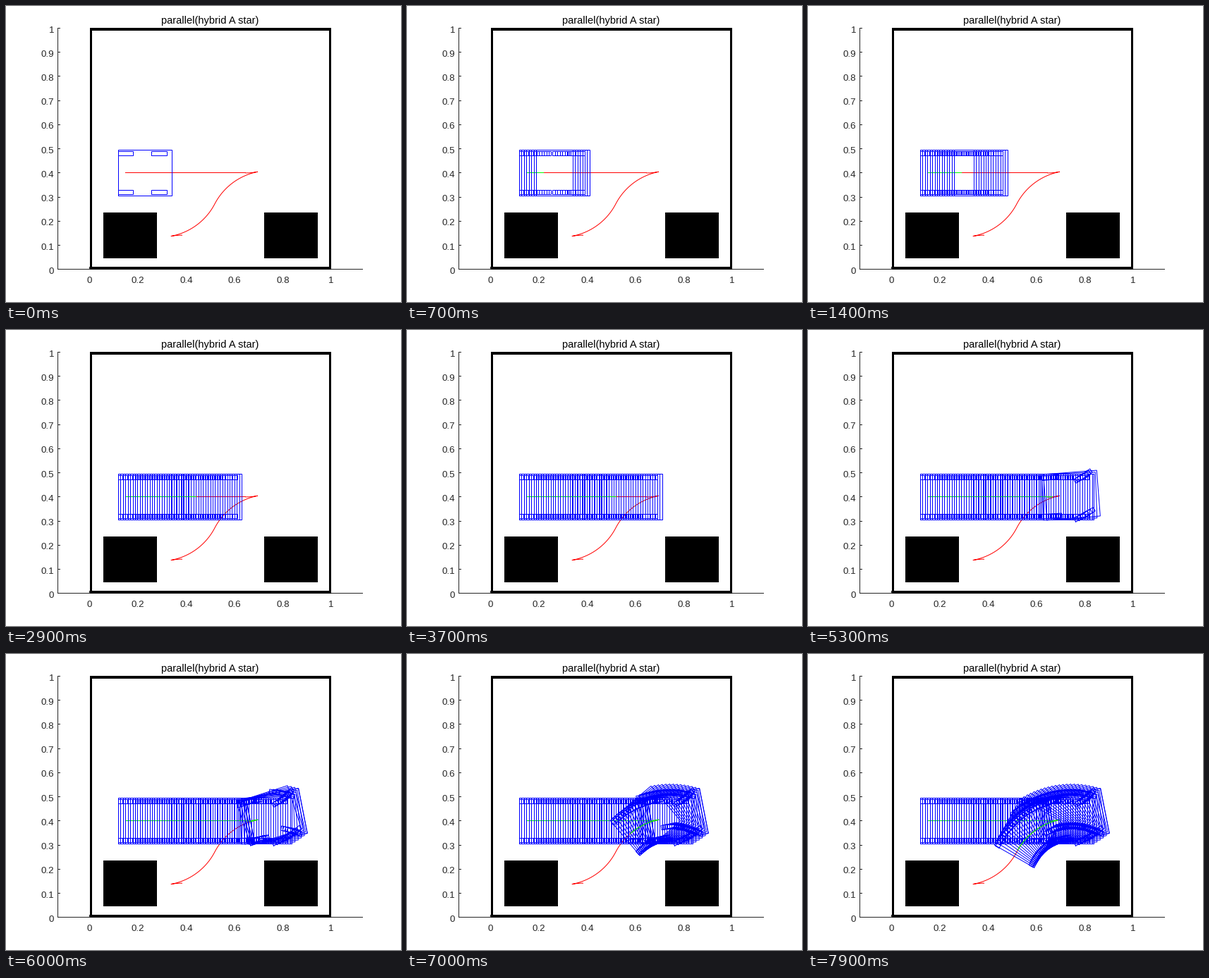
A matplotlib script that plays this animation: 560 px wide and 420 px high, repeating every 8 s.

```python
import numpy as np
import matplotlib
import matplotlib.pyplot as plt
from matplotlib.animation import FuncAnimation
from matplotlib.patches import Rectangle

matplotlib.rcParams["path.simplify"] = False
matplotlib.rcParams["font.family"] = "Liberation Sans"

W, H, DPI = 560, 420, 100
PT = 72 / DPI  # points per pixel
ORIGIN, SCALE = np.array([118.65, 373.8]), 342.3
GREY = "#262626"

BASE, STEER, STEP = 0.14, 0.5, 0.01
RADIUS = BASE / np.tan(STEER)
REAR, FRONT, HALF_W = 0.0305, 0.191, 0.095
WHEEL_L, WHEEL_H, TRACK = 0.032, 0.009, 0.08
START, TURN_X, LANE = 0.15, 0.646, 0.4


def to_px(pts):
    return ORIGIN + np.asarray(pts, float) * [SCALE, -SCALE]


def crisp(pts):
    """Put polylines with only level and upright sides on pixel centres."""
    sides = np.abs(np.diff(pts, axis=0))
    return np.floor(pts) + 0.5 if np.all(sides.min(axis=1) < 1e-6) else pts


def drive(pose, dist, turn):
    """Move along a circle; negative dist reverses, turn is +1 left, -1 right."""
    x, y, a = pose
    b = a + dist * turn / RADIUS
    r = turn * RADIUS
    return x + r * (np.sin(b) - np.sin(a)), y - r * (np.cos(b) - np.cos(a)), b


def rotate(pts, a):
    c, s = np.cos(a), np.sin(a)
    return pts @ np.array([[c, s], [-s, c]])


def box(x1, x2, y1, y2):
    return np.array([[x1, y1], [x2, y1], [x2, y2], [x1, y2], [x1, y1]])


def car_parts(pose, steer):
    wheel = box(-WHEEL_L, WHEEL_L, -WHEEL_H, WHEEL_H)
    parts = [box(-REAR, FRONT, -HALF_W, HALF_W)]
    for side in (-TRACK, TRACK):
        parts += [wheel + [0, side], rotate(wheel, steer) + [BASE, side]]
    return [rotate(p, pose[2]) + pose[:2] for p in parts]


# Poses: straight ahead, forward to the left, then back with right lock
corner = (TURN_X, LANE, 0.0)
cusp = drive(corner, 5 * STEP, 1)
poses = [((min(START + STEP * i, TURN_X), LANE, 0.0), 0.0) for i in range(51)]
poses += [(drive(corner, STEP * i, 1), STEER) for i in range(6)]
poses += [(drive(cusp, -STEP * i, -1), -STEER) for i in range(23)]
FRAMES = len(poses)

# Curved part of the planned route
curve, pose = [], corner
for dist, turn in ((0.05, 1), (-0.2296, -1), (-0.2335, 1), (0.046, -1)):
    curve += [drive(pose, d, turn)[:2] for d in np.linspace(0, dist, 40)]
    pose = drive(pose, dist, turn)

fig = plt.figure(figsize=(W / DPI, H / DPI), dpi=DPI, facecolor="white")
ax = fig.add_axes([0, 0, 1, 1])
ax.set_xlim(0, W)
ax.set_ylim(H, 0)
ax.axis("off")


def stroke(parts, color, z=2):
    """Draw several pixel polylines as one artist."""
    gap = np.full((1, 2), np.nan)
    pts = np.vstack([p for part in parts for p in (crisp(np.asarray(part)), gap)])
    return ax.plot(*pts.T, color=color, lw=PT, zorder=z, snap=False,
                   solid_capstyle="projecting", solid_joinstyle="miter")[0]


def block(x1, x2, y1, y2):
    (l, b), (r, t) = np.ceil(to_px([(x1, y1), (x2, y2)]) - 0.5)
    ax.add_patch(Rectangle((l, t), r - l, b - t, fc="black", lw=0, snap=False,
                           zorder=1.5))


def label(x, y, text, size, ha="center", color=GREY):
    ax.text(x, y, text, fontsize=size * PT, ha=ha, va="baseline", color=color)


# Axes
LEFT, RIGHT, TICK = 73.3, 505.9, 3.5
(x0, bottom), (x1, top) = to_px([(0, 0), (1, 1)])
lines = [[(LEFT, top), (LEFT, bottom), (RIGHT, bottom)]]
for i in range(11):
    v = i / 10
    x, y = to_px((v, v))
    lines.append([(LEFT, y), (LEFT + TICK, y)])
    label(68, y + 6, f"{v:g}", 13.33, "right")
    if i % 2 == 0:
        lines.append([(x, bottom), (x, bottom - TICK)])
        label(x, 393, f"{v:g}", 13.33)
stroke(lines, GREY, 1)
label(289.5, 25, "parallel(hybrid A star)", 14.67, color="black")

# Walls and parked cars
for wall in ((0, 0.01, 0, 1), (0.99, 1, 0, 1), (0, 1, 0, 0.01), (0, 1, 0.99, 1)):
    block(*wall)
for x in (0.057, 0.7235):
    block(x, x + 0.2205, 0.045, 0.235)

stroke([to_px([(START, LANE), corner[:2]]), to_px(curve)], "#ff0000")
steps = []
for k, (pose, steer) in enumerate(poses):
    prev = poses[max(k - 1, 0)][0]
    group = [stroke([to_px(p) for p in car_parts(pose, steer)], "#0000ff")]
    if prev[:2] != pose[:2]:
        group.append(stroke([to_px([prev[:2], pose[:2]])], "#00ff00"))
    steps.append(group)


def update(frame):
    for k, group in enumerate(steps):
        for artist in group:
            artist.set_visible(k <= frame)
    return []


anim = FuncAnimation(fig, update, frames=FRAMES, interval=100, repeat=True,
                     repeat_delay=0, init_func=lambda: update(0), blit=False)
plt.show()
```
